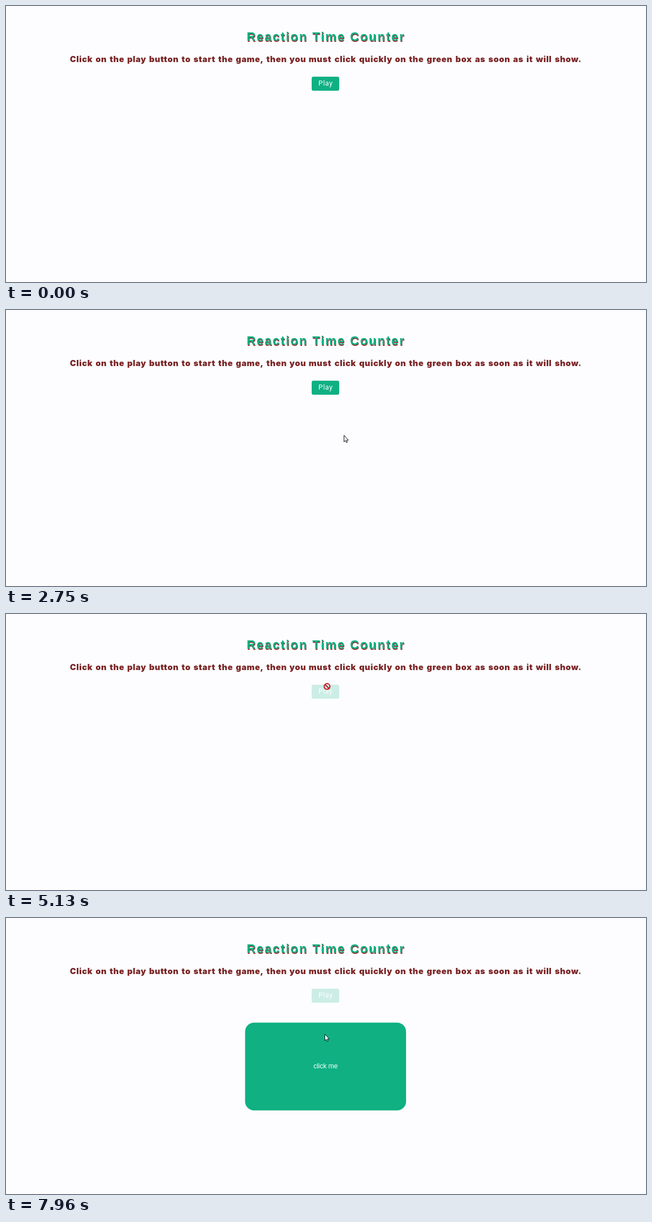
Write an HTML page that moves like this. It is 1139 by 492 pixels and loops after 8000 ms.

```html
<!DOCTYPE html>
<html lang="en">
<head>
<meta charset="utf-8">
<title>Reaction Time Counter</title>
<style>
html, body { margin: 0; width: 100%; height: 100%; overflow: hidden; background: #fdfdff; }
svg { display: block; width: 1139px; height: 492px; }
text { text-anchor: middle; }
.title { font: bold 22px "Liberation Sans", Arial, sans-serif; letter-spacing: 2px; }
.lead { font: 900 14.7px Inter, "DejaVu Sans", sans-serif; letter-spacing: .6px; fill: #7b2424; }
.play { font: 12.2px Roboto, "Liberation Sans", sans-serif; letter-spacing: .7px; fill: #fff; }
.click { font: 12px "Liberation Sans", Arial, sans-serif; fill: #fff; }
.pointer { fill: #fff; stroke: #111; stroke-width: 1; stroke-linejoin: round; }
</style>
</head>
<body>
<svg viewBox="0 0 1139 492">
  <rect width="1139" height="492" fill="#fdfdff"/>
  <text class="title" x="570.2" y="64" fill="#8d3b35">Reaction Time Counter</text>
  <text class="title" x="569.4" y="62" fill="#10b083">Reaction Time Counter</text>
  <text class="lead" id="lead" y="100"></text>
  <g id="button">
    <rect x="544" y="126" width="49" height="25" rx="3" fill="#10b083"/>
    <text class="play" x="568.9" y="142.3">Play</text>
  </g>
  <g id="target">
    <rect x="425.5" y="186.5" width="286.5" height="156.5" rx="16" fill="#10b083"/>
    <text class="click" x="568.8" y="268.3">click me</text>
  </g>
  <g id="cursor">
    <path id="arrow" class="pointer" d="M.5 .5V12.2L3 9.9L4.9 13.6L6.6 12.8L4.8 9.2H8.3Z"/>
    <g id="hand" class="pointer">
      <path d="M-1.6 1.2Q-1.5-.4 0-.4Q1.5-.4 1.5 1.2V5.3Q3.8 5 4.1 6.4Q6.2 5.9 6.5 7.4Q8 7 8.1 9V12Q8 14 6.8 16.6H-.4Q-1.2 13.6-4.3 10.4Q-5.3 8.2-3.4 8.2L-1.6 9.7Z"/>
      <path d="M1.5 5.3V8.5M4.1 6.4V8.7M6.5 7.4V9" fill="none" stroke-width=".8"/>
    </g>
    <g id="ban" fill="none" stroke="#c4101c" stroke-width="2">
      <circle r="5.1"/>
      <path d="M-3.6-3.6L3.6 3.6"/>
    </g>
  </g>
</svg>
<script>
const LOOP = 8000;
const $ = id => document.getElementById(id);
const show = (id, on) => $(id).setAttribute("visibility", on ? "visible" : "hidden");

// Wide black lettering: place each word by its advance in em
const em = c => " ,.il".includes(c) ? .333 : "rt".includes(c) ? .444 : "svy".includes(c) ? .611
  : c === "m" ? 1 : c === "w" ? .944 : c === "C" ? .778 : .667;
const line = "Click on the play button to start the game, then you must click quickly on the green box as soon as it will show.";
const size = 14.87;
let x = 113;
for (const word of line.split(" ")) {
  const w = size * [...word].reduce((sum, c) => sum + em(c), 0);
  const span = document.createElementNS("http://www.w3.org/2000/svg", "tspan");
  span.setAttribute("x", (x + w / 2 + .3).toFixed(2));
  span.textContent = word;
  $("lead").append(span);
  x += w + size * em(" ");
}

// Pointer path: time, x, y
const path = [
  [1830, 738, 486], [2130, 680, 389.5], [2350, 640, 310], [2580, 613, 253],
  [2660, 613, 253], [2820, 592, 200], [2960, 577, 154], [3120, 567, 128],
  [3250, 571, 134.5], [3460, 571, 133.5], [3500, 569.5, 132], [4410, 569.5, 132],
  [4420, 569, 128], [5030, 569, 128], [5200, 573, 130], [5400, 569, 137], [5540, 567, 140.5],
  [7780, 567, 140.5], [7830, 567, 150], [7960, 567, 206.5], [8000, 567, 206.5]
];

function place(t) {
  const i = Math.max(1, path.findIndex(p => p[0] > t));
  const [a, b] = [path[i - 1], path[i]];
  const k = Math.max(0, (t - a[0]) / (b[0] - a[0]));
  return [a[1] + (b[1] - a[1]) * k, a[2] + (b[2] - a[2]) * k];
}

function draw(t) {
  const [px, py] = place(t);
  const disabled = t >= 4420;
  const overButton = px >= 544 && px <= 593 && py >= 126 && py <= 151;
  const banned = overButton && t >= 5040;
  const visible = t >= 1830;
  $("cursor").setAttribute("transform", `translate(${px.toFixed(2)} ${py.toFixed(2)})`);
  show("arrow", visible && !overButton);
  show("hand", visible && overButton && !banned);
  show("ban", visible && banned);
  $("button").setAttribute("opacity", disabled ? .2 : 1);
  show("target", t >= 7420);
}

function tick() {
  draw(performance.now() % LOOP);
  requestAnimationFrame(tick);
}
tick();
</script>
</body>
</html>
```
